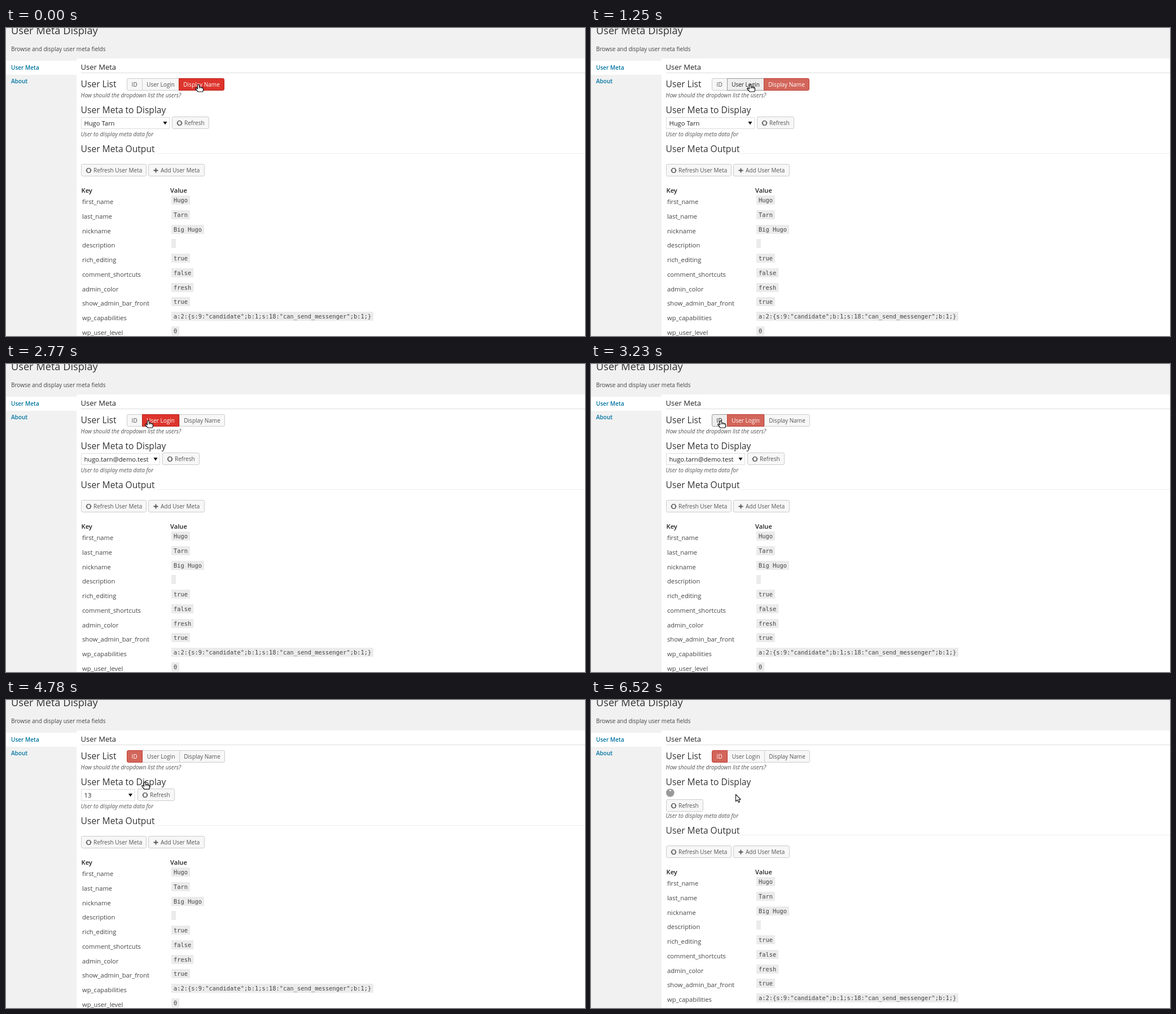
Recreate the animation shown at these times as an HTML page. Size 1026x546 px, loop 6.54 s.

```html
<!DOCTYPE html>
<html lang="en">
<head>
<meta charset="utf-8">
<title>User Meta Display</title>
<style>
html, body { margin: 0; width: 100%; height: 100%; overflow: hidden; background: #fff; }
svg { display: block; width: 1026px; height: 546px; font-family: "Open Sans", sans-serif; }
text { font-size: 10px; fill: #444; white-space: pre; }
.title { font-size: 18.2px; fill: #333; }
.h3 { font-size: 13px; fill: #222; }
.h4 { font-size: 15.6px; fill: #333; }
.tab { font-weight: 600; fill: #0074a2; }
.hint { font-style: italic; fill: #555; }
.th { font-size: 11.2px; font-weight: 600; fill: #222; }
.cell, .pick { font-size: 11.2px; }
.pick { fill: #222; }
.code { font: 10.4px "DejaVu Sans Mono", monospace; fill: #444; }
.btn rect, .btn path.box { fill: #f7f7f7; stroke: #ccc; }
.btn text { fill: #555; }
.btn.hover rect, .btn.hover path.box { fill: #eee; stroke: #999; }
.btn.hover text { fill: #222; }
.btn.on path.box { fill: #d3655a; stroke: #bf3c31; }
.btn.on.hover path.box { fill: #dd342c; stroke: #b8231c; }
.btn.on text { fill: #fff; }
</style>
</head>
<body>
<svg id="stage" viewBox="0 0 1026 546"></svg>
<script>
const LOOP = 6540;
const stage = document.getElementById('stage');
const $ = id => document.getElementById(id);

const label = (x, y, s, cls = '') => `<text x="${x}" y="${y}" class="${cls}">${s}</text>`;
const box = (x, y, w, h, fill) => `<rect x="${x}" y="${y}" width="${w}" height="${h}" fill="${fill}"/>`;

const arc = '<path d="M-3.7-.4A3.7 3.7 0 0 1 3.6-1" fill="none" stroke="#555" stroke-width="1.3"/>' +
  '<path d="M1.7-1H5.5L3.7 1.5Z" fill="#555"/>';
const refreshIcon = (x, y) =>
  `<g transform="translate(${x} ${y})">${arc}<g transform="rotate(180)">${arc}</g></g>`;
const plusIcon = (x, y) =>
  `<path d="M${x - 4} ${y}h8m-4-4v8" stroke="#555" stroke-width="1.8"/>`;

const button = (id, x, y, w, text, icon) =>
  `<g id="${id}" class="btn" transform="translate(${x} ${y})">
    <rect x=".5" y=".5" width="${w - 1}" height="21" rx="2.4"/>
    ${icon(13.5, 11.5)}${label(22, 15, text)}</g>`;

const rows = [
  ['first_name', 'Hugo'],
  ['last_name', 'Tarn'],
  ['nickname', 'Big Hugo'],
  ['description', ''],
  ['rich_editing', 'true'],
  ['comment_shortcuts', 'false'],
  ['admin_color', 'fresh'],
  ['show_admin_bar_front', 'true'],
  ['wp_capabilities', 'a:2:{s:9:"candidate";b:1;s:18:"can_send_messenger";b:1;}'],
  ['wp_user_level', '0']
];

const table = rows.map(([key, value], i) => {
  const y = Math.round(i * 25.75);
  return label(135, 312 + y, key, 'cell') +
    box(293, 297 + y, (value.length * 6.25 + 8).toFixed(1), 16, '#ebebeb') +
    label(297, 309 + y, value, 'code');
}).join('');

const groupButton = (id, text) =>
  `<g id="${id}" class="btn"><path class="box"/>${label(0, 104, text)}</g>`;

stage.innerHTML =
  box(0, 0, 1026, 546, '#fff') +
  box(0, 0, 1026, 54, '#f1f1f1') +
  box(0, 54, 125, 492, '#f1f1f1') +
  box(0, 58, 125, 25, '#fff') +
  label(9, 11, 'User Meta Display', 'title') +
  label(9, 41, 'Browse and display user meta fields') +
  label(9, 74, 'User Meta', 'tab') +
  label(9, 98, 'About', 'tab') +
  label(132.6, 74, 'User Meta', 'h3') +
  box(133, 79, 893, 1, '#ddd') +
  label(132.6, 105, 'User List', 'h4') +
  '<g id="group">' + groupButton('id', 'ID') + groupButton('login', 'User Login') +
  groupButton('name', 'Display Name') + '</g>' +
  label(132.6, 123, 'How should the dropdown list the users?', 'hint') +
  label(132.6, 151, 'User Meta to Display', 'h4') +
  `<g id="select">
    <rect id="frame" x="133.5" y="158.5" height="20" fill="#fff" stroke="#ddd"/>
    <text id="choice" class="pick" x="138.5" y="173"></text>
    <path id="caret" d="M0 0h7l-3.5 5.5z" fill="#111"/>
  </g>
  <g id="spinner">
    <circle cx="140.3" cy="164.5" r="7.3" fill="#999"/>
    <circle id="dot" r="1.5" fill="#fff"/>
  </g>` +
  button('refresh', 0, 0, 66, 'Refresh', refreshIcon) +
  '<g id="lower">' +
  label(132.6, 192, 'User to display meta data for', 'hint') +
  box(263, 222, 763, 1, '#eee') +
  label(132.6, 220, 'User Meta Output', 'h4') +
  button('reload', 133, 241, 116, 'Refresh User Meta', refreshIcon) +
  button('add', 252, 241, 100, 'Add User Meta', plusIcon) +
  label(133.5, 292, 'Key', 'th') +
  label(291, 292, 'Value', 'th') +
  table +
  '</g>' +
  `<g id="pointer" fill="#fff" stroke="#111" stroke-linejoin="round">
    <g id="hand">
      <path d="M-1.5 1.5Q0-.7 1.5 1.5V5Q3 4 4 5.2Q5.5 4.5 6.5 5.8Q8.5 5.5 8.5 7.5V10Q8.5 11.5 7.5 13H-1Q-2 11.5-5 8Q-5.5 6-3.8 6.2L-1.5 8Z" stroke-width="1.2"/>
      <path d="M1.5 5V7.5M4 5.2V7.5M6.5 5.8V7.8" stroke-width=".8"/>
    </g>
    <path id="arrow" d="M.5 .5V12.8L3.4 10.1L5.5 14.6L7.6 13.6L5.6 9.3H9.4Z" stroke-width="1.1"/>
  </g>`;

// [time, x, y] of the fingertip
const track = [
  [710, 341, 100], [1180, 282, 100],
  [2530, 282, 100], [2770, 252, 100], [3020, 230, 100],
  [4570, 230, 100], [4780, 246, 145], [5130, 256, 167]
];

function pointerAt(t) {
  const next = track.findIndex(p => p[0] > t);
  if (next === 0) return track[0].slice(1);
  if (next < 0) return track[track.length - 1].slice(1);
  const [t0, x0, y0] = track[next - 1], [t1, x1, y1] = track[next];
  const k = (t - t0) / (t1 - t0);
  return [x0 + (x1 - x0) * k, y0 + (y1 - y0) * k];
}

// Each step: start time, chosen list mode, whether the list is loading
const steps = [
  [0, 'name', false], [1300, 'login', true], [2300, 'login', false],
  [3280, 'id', true], [4240, 'id', false], [5320, 'id', true]
];
const lists = {
  name: { right: 290, text: 'Hugo Tarn' },
  login: { right: 273, text: 'hugo.tarn@demo.test' },
  id: { right: 228.5, text: '13' }
};

const show = (id, on) => $(id).setAttribute('display', on ? 'inline' : 'none');
const move = (id, x, y) => $(id).setAttribute('transform', `translate(${x} ${y})`);

function outline(x, w, left, right) {
  const l = left ? 2.4 : 0, r = right ? 2.4 : 0;
  return `M${x + l} 89.5H${x + w - r}q${r} 0 ${r} ${r}V${110.5 - r}q0 ${r} ${-r} ${r}` +
    `H${x + l}q${-l} 0 ${-l} ${-l}V${89.5 + l}q0 ${-l} ${l} ${-l}Z`;
}

function drawGroup(mode, px, py) {
  const nameX = mode === 'name' ? 306.5 : 307.5;
  const parts = [
    ['id', 214.5, 27, 222.6],
    ['login', 241.5, mode === 'login' ? 65 : 66, mode === 'id' ? 249.8 : 249.2],
    ['name', nameX, 80, nameX + 7.8]
  ];
  const order = parts.map(([id, x, w, textX]) => {
    const hover = py > 89 && py < 111 && px >= x && px < x + w;
    const on = id === mode;
    const el = $(id);
    el.setAttribute('class', 'btn' + (on ? ' on' : '') + (hover ? ' hover' : ''));
    el.firstChild.setAttribute('d', outline(x, w, id === 'id', id === 'name'));
    el.lastChild.setAttribute('x', textX);
    return { el, rank: on * 2 + hover };
  });
  order.sort((a, b) => a.rank - b.rank).forEach(o => $('group').appendChild(o.el));
}

function draw(t) {
  const [, mode, loading] = steps.filter(s => s[0] <= t).pop();
  const [px, py] = pointerAt(t);
  drawGroup(mode, px, py);

  const { right, text } = lists[mode];
  show('select', !loading);
  show('spinner', loading);
  $('frame').setAttribute('width', right - 134);
  $('choice').textContent = text;
  move('caret', right - 11.5, 166);

  const turn = (170 + 0.353 * (t - 1900)) * Math.PI / 180;
  $('dot').setAttribute('cx', 140.4 + 4.2 * Math.sin(turn));
  $('dot').setAttribute('cy', 164.5 - 4.2 * Math.cos(turn));

  const bx = loading ? 133 : Math.round(right + 4), by = loading ? 176 : 157;
  const over = px > bx && px < bx + 66 && py > by && py < by + 22;
  move('refresh', bx, by);
  $('refresh').setAttribute('class', over ? 'btn hover' : 'btn');
  move('lower', 0, loading ? 17 : 0);

  const arrow = loading && py > 111;
  show('arrow', arrow);
  show('hand', !arrow);
  move('pointer', px, py);
}

const start = performance.now();
function tick() {
  draw((performance.now() - start) % LOOP);
  requestAnimationFrame(tick);
}
tick();
</script>
</body>
</html>
```
